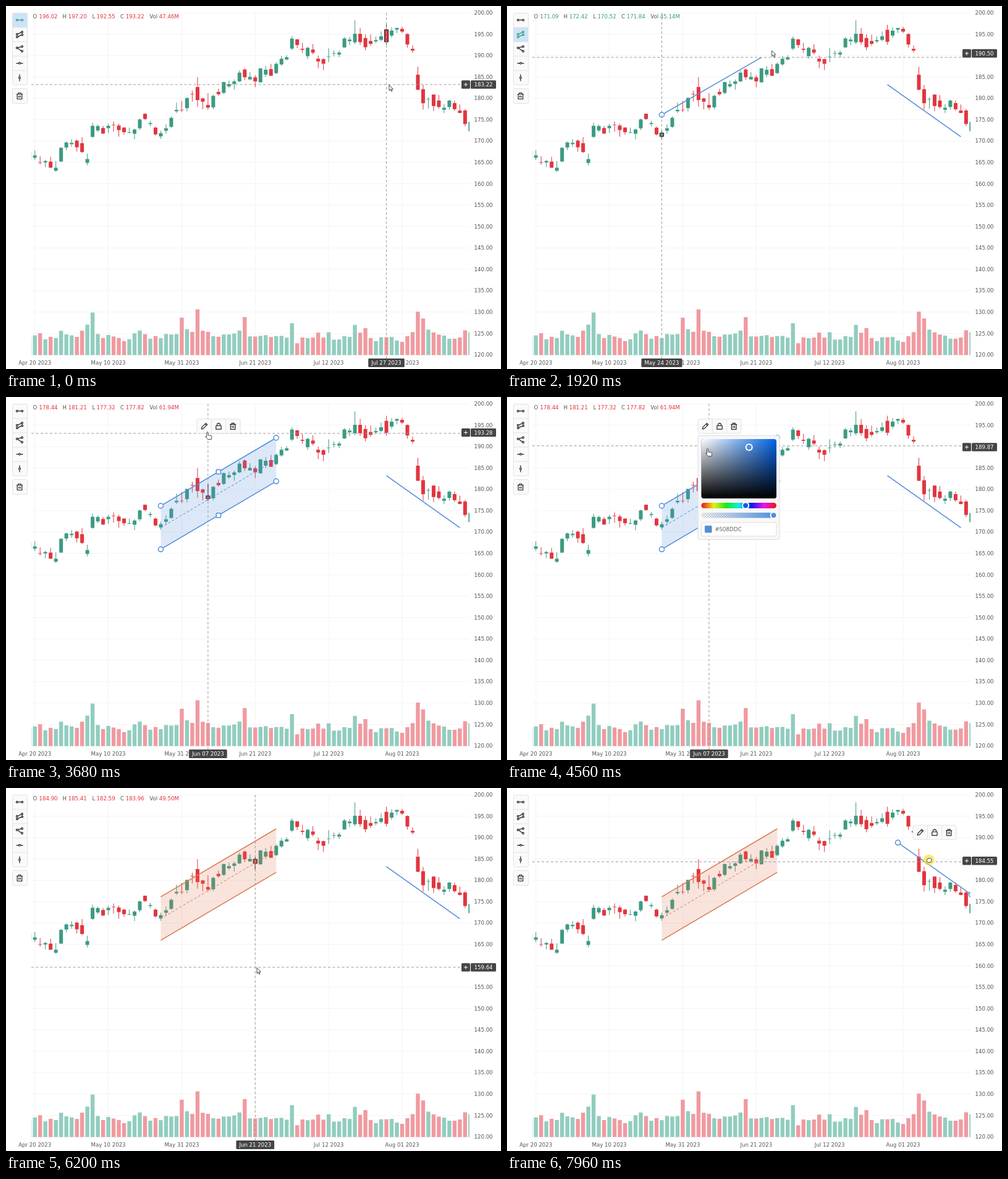
Animation of 801 by 587 pixels, one loop 8000 ms. Source, as an HTML page:

```html
<!DOCTYPE html>
<html lang="en">
<head>
<meta charset="utf-8">
<title>Chart drawing tools</title>
<style>
html, body { margin: 0; width: 100%; height: 100%; overflow: hidden; background: #fff; }
svg { display: block; font: 8.6px "DejaVu Sans", sans-serif; fill: #555; }
</style>
</head>
<body>
<svg id="stage" width="801" height="587" viewBox="0 0 801 587"></svg>
<script>
const LOOP = 8000, UP = '#3c9a82', DOWN = '#e2353f', DARK = '#454545';
const NS = 'http://www.w3.org/2000/svg';
const stage = document.getElementById('stage');

// Daily bars, first one on Apr 19 2023
const open = [165.8, 166.09, 165.05, 165, 165.19, 163.06, 165.19, 168.49, 169.28, 170.09, 169.5, 164.89, 170.98, 172.48, 173.05,
  173.02, 173.85, 173.62, 173.16, 171.99, 171.71, 173, 176.39, 173.98, 173.13, 171.09, 172.41, 173.32, 176.96,
  177.33, 177.7, 181.03, 182.63, 179.97, 178.44, 177.9, 181.5, 181.27, 182.8, 183.37, 183.96, 186.73, 184.41,
  184.9, 183.74, 185.55, 186.83, 185.89, 187.93, 189.08, 191.63, 193.78, 191.57, 189.84, 191.41, 189.26, 189.16,
  189.68, 190.5, 190.23, 191.9, 193.35, 193.1, 195.09, 194.1, 193.41, 193.33, 193.67, 196.02, 194.67, 196.06,
  196.24, 195.04, 191.57, 185.52, 182.13, 179.69, 180.87, 179.48, 177.32, 177.97, 178.88, 177.13, 177.14, 172.3];
const close = [167.63, 166.65, 165.02, 165.33, 163.77, 163.76, 168.41, 169.68, 169.59, 168.54, 167.45, 165.79, 173.57, 173.5, 171.77,
  173.56, 173.75, 172.57, 172.07, 172.07, 172.69, 175.05, 175.16, 174.2, 171.56, 171.84, 172.99, 175.43, 177.3,
  177.25, 180.09, 180.95, 179.58, 179.21, 177.82, 180.57, 180.96, 183.79, 183.31, 183.95, 186.01, 184.92, 185.01,
  183.96, 187, 186.68, 185.27, 188.06, 189.25, 189.59, 193.97, 192.46, 191.33, 191.81, 190.68, 188.61, 188.08,
  189.77, 190.54, 190.69, 193.99, 193.73, 195.1, 193.13, 191.94, 192.75, 193.62, 194.5, 193.22, 195.83, 196.45,
  195.61, 192.58, 191.17, 181.99, 178.85, 179.8, 178.19, 177.97, 177.79, 179.46, 177.45, 176.57, 174, 174.49];
const high = [168.16, 167.87, 166.45, 165.6, 166.31, 165.28, 168.56, 169.85, 170.45, 170.35, 170.92, 167.04, 174.3, 173.85, 173.54,
  174.03, 174.59, 174.06, 173.21, 173.14, 172.93, 175.24, 176.39, 174.71, 173.38, 172.42, 173.9, 175.77, 178.99,
  179.35, 180.12, 181.78, 184.95, 180.12, 181.21, 180.84, 182.23, 183.89, 184.15, 184.39, 186.52, 186.99, 186.1,
  185.41, 187.05, 187.56, 188.05, 188.39, 189.9, 190.07, 194.48, 193.88, 192.98, 192.02, 192.67, 189.99, 189.3,
  191.7, 191.19, 191.18, 194.32, 194.33, 198.23, 196.47, 194.97, 194.91, 194.44, 195.64, 197.2, 196.63, 196.49,
  196.73, 195.18, 192.37, 187.38, 183.13, 180.27, 180.93, 180.75, 178.62, 179.69, 179.48, 178.54, 177.51, 175.1];
const low = [165.54, 165.56, 164.49, 163.89, 163.73, 162.8, 165.19, 167.88, 168.64, 167.54, 167.16, 164.31, 170.76, 172.11, 171.6,
  171.9, 172.17, 171, 171.47, 171.8, 170.42, 172.58, 174.94, 173.45, 171.28, 170.52, 171.69, 173.11, 176.57,
  176.76, 176.93, 179.26, 178.04, 177.43, 177.32, 177.46, 180.63, 180.97, 182.44, 182.02, 183.78, 184.27, 184.41,
  182.59, 183.67, 185.01, 185.23, 185.67, 187.6, 188.94, 191.26, 191.76, 190.62, 189.2, 190.24, 187.04, 186.6,
  188.47, 189.78, 189.63, 191.81, 192.42, 192.65, 192.5, 191.23, 192.25, 192.92, 193.32, 192.55, 194.14, 195.26,
  195.28, 191.85, 190.69, 181.92, 177.35, 177.58, 177.01, 177.6, 176.55, 177.31, 177.05, 176.5, 173.48, 171.96];
const volume = [47.7, 52.5, 58.3, 41.9, 48.7, 45.5, 64.9, 55.2, 52.5, 48.4, 65.1, 81.2, 113.3, 56, 45.3,
  53.7, 49.5, 45.5, 37.3, 42.1, 58, 65.5, 55.8, 43.6, 50.7, 45.14, 56.1, 54.8, 56,
  99.6, 68.9, 61.9, 121.9, 64.8, 61.94, 50.2, 48.9, 54.8, 54.9, 57.5, 65.4, 101.2, 49.8,
  49.5, 51.2, 53.1, 48.1, 50.7, 51.2, 46.3, 85.1, 31.5, 46.9, 45.1, 46.8, 59.9, 46.6,
  60.75, 41.3, 41.6, 50.5, 48.4, 80.5, 59.6, 71.9, 45.4, 37.3, 47.5, 47.46, 48.3, 38.8,
  35.2, 50.39, 61.2, 115.8, 97.6, 67.8, 60.4, 54.7, 52, 43.7, 43.6, 46.96, 66.1, 61.2];

const X0 = 46.7, STEP = 8.49, PX = 6.9125;
const barX = i => X0 + i * STEP;
const barAt = x => Math.round((x - X0) / STEP);
const priceY = p => 11 + (200 - p) * PX;
const yPrice = y => 200 - (y - 11) / PX;
const rises = k => close[k] >= open[k];

const days = [];
for (let d = new Date(Date.UTC(2023, 3, 19)); days.length < open.length; d.setUTCDate(d.getUTCDate() + 1)) {
  const name = d.toLocaleDateString('en-US', { month: 'short', day: '2-digit', timeZone: 'UTC' }) + ' 2023';
  const closed = /May 29|Jun 19|Jul 04/.test(name);
  if (d.getUTCDay() % 6 && !closed) days.push(name);
}

function set(node, attrs) {
  for (const k in attrs) node.setAttribute(k, attrs[k]);
  return node;
}
function add(parent, tag, attrs = {}, text) {
  const node = parent.appendChild(set(document.createElementNS(NS, tag), attrs));
  if (text !== undefined) node.textContent = text;
  return node;
}
const group = (parent, attrs) => add(parent, 'g', attrs);
const rect = (parent, x, y, width, height, fill, more) => add(parent, 'rect', { x, y, width, height, fill, ...more });
const line = (parent, x1, y1, x2, y2, stroke, more) => add(parent, 'line', { x1, y1, x2, y2, stroke, ...more });
const path = (parent, d, more) => add(parent, 'path', { d, ...more });
const show = (node, on) => node.setAttribute('visibility', on ? 'inherit' : 'hidden');
const move = (node, x, y) => node.setAttribute('transform', `translate(${x} ${y})`);

const defs = add(stage, 'defs');
rect(add(defs, 'clipPath', { id: 'plot' }), 41, 8, 709, 557, '#000');
function gradient(id, stops, vertical) {
  const g = add(defs, 'linearGradient', vertical ? { id, x2: 0, y2: 1 } : { id });
  return stops.map(([color, alpha], i) =>
    add(g, 'stop', { offset: i / (stops.length - 1), 'stop-color': color, 'stop-opacity': alpha }));
}
gradient('white', [['#fff', 1], ['#fff', 0]]);
gradient('black', [['#000', 0], ['#000', 1]], true);
gradient('rainbow', [0, 60, 120, 180, 240, 300, 360].map(h => [`hsl(${h} 85% 50%)`, 1]));
const alphaStops = gradient('alpha', [['#000', 0], ['#000', 1]]);
const check = add(defs, 'pattern', { id: 'check', width: 4, height: 4, patternUnits: 'userSpaceOnUse' });
rect(check, 0, 0, 4, 4, '#fff');
path(check, 'M0 0h2v4h2v-2h-4z', { fill: '#ccc' });

// Grid, axes and bars
for (let p = 120; p <= 200; p += 5) {
  const y = priceY(p);
  line(stage, 41, y, 750, y, '#f4f4f4');
  add(stage, 'text', { x: 757.5, y: y + 3.1 }, p.toFixed(2));
}
for (let i = 0; i <= 70; i += 14) {
  line(stage, barX(i), 11, barX(i), 564, '#f4f4f4');
  add(stage, 'text', { x: barX(i), y: 579.7, 'text-anchor': 'middle' }, days[i + 1]);
}
const plot = group(stage, { 'clip-path': 'url(#plot)' });
function candle(parent, k, edge) {
  const x = barX(k - 1), color = rises(k) ? UP : DOWN;
  const top = priceY(Math.max(open[k], close[k])), h = Math.abs(open[k] - close[k]) * PX;
  line(parent, x, priceY(high[k]), x, priceY(low[k]), edge || color);
  rect(parent, x - 3, top, 6, Math.max(h, 0.8), color, edge ? { stroke: edge, 'stroke-width': 1.3 } : {});
}
open.forEach((_, k) => {
  const h = volume[k] * 0.607;
  rect(plot, barX(k - 1) - 3.2, 564.5 - h, 6.4, h, rises(k) ? '#91cdbf' : '#f09aa0');
  candle(plot, k);
});
const hover = group(plot);

// Drawings
const trend = group(plot, { fill: '#fff', 'stroke-width': 1.5 });
const channel = group(plot, { 'stroke-width': 1.5 });
const knob = (parent, shape) => shape === 'square'
  ? rect(parent, -3.6, -3.6, 7.2, 7.2, '#fff', { rx: 1 })
  : add(parent, 'circle', { r: 4, fill: '#fff' });
const trendLine = line(trend, 0, 0, 0, 0, '');
const trendKnobs = [knob(trend), knob(trend)];
const band = path(channel, '', { stroke: 'none', 'fill-opacity': 0.2 });
const edges = path(channel, '', { fill: 'none' });
const median = path(channel, '', { fill: 'none', 'stroke-width': 1, 'stroke-dasharray': '4 3' });
const bandKnobs = ['', '', '', '', 'square', 'square'].map(s => knob(channel, s));

// Legend and crosshair
const legend = group(stage);
const legendValues = [['O', 43.5, 53.5], ['H', 91.5, 100.7], ['L', 139.5, 146.6], ['C', 185, 193.7], ['Vol', 232.3, 247.8]].map(([name, x, vx]) => {
  add(legend, 'text', { x, y: 20.2 }, name);
  return add(legend, 'text', { x: vx, y: 20.2 });
});
const dash = { 'stroke-dasharray': '4 3.5' };
const across = line(stage, 41, 0, 737, 0, '#999', dash);
const upright = line(stage, 0, 11, 0, 570, '#999', dash);
const priceTag = group(stage);
rect(priceTag, 737, -6.8, 14, 13.6, DARK, { rx: 1.5 });
rect(priceTag, 752, -6.8, 41, 13.6, DARK, { rx: 1.5 });
path(priceTag, 'M741 0h6M744-3v6', { stroke: '#fff' });
const priceText = add(priceTag, 'text', { x: 757.5, y: 3.1, fill: '#fff' });
const dateTag = group(stage);
const dateBox = rect(dateTag, 0, 570, 0, 14, DARK, { rx: 1.5 });
const dateText = add(dateTag, 'text', { y: 579.9, fill: '#fff', 'text-anchor': 'middle' });

// Tool palette
const BORDER = '#e2e2e2';
rect(stage, 10.5, 11.5, 24, 116, '#fafafa', { rx: 2, stroke: BORDER });
rect(stage, 10.5, 133.5, 24, 24, '#fafafa', { rx: 2, stroke: BORDER });
const picked = rect(stage, 11, 0, 23, 23, '#cde4f8');
for (let i = 1; i < 5; i++) line(stage, 11, 11.5 + i * 23.2, 34, 11.5 + i * 23.2, BORDER);
const dot = (x, y) => `M${x - 1.4} ${y}a1.4 1.4 0 1 0 2.8 0a1.4 1.4 0 1 0-2.8 0z`;
const tools = [
  dot(-4.2, 0) + dot(4.2, 0) + 'M-2.8 0h5.6',
  dot(-4.2, -.2) + dot(4, -4) + dot(-4, 4) + dot(4.2, .5) + 'M-2.8-.8L2.6-3.4M-2.6 3.4L2.8 1.1',
  dot(-4.2, -1.6) + dot(4, -3.8) + dot(4, 3.8) + 'M-2.8-1.9L2.6-3.4M-3-1L2.6 3.1',
  dot(0, 0) + 'M-5.5 0h4.1M1.4 0h4.1',
  dot(0, 0) + 'M0-5.5v4.1M0 1.4v4.1'
].map((d, i) => path(stage, d, { fill: 'none', 'stroke-width': 1.2, transform: `translate(22 ${22.7 + i * 23.3})` }));
const ICON = { fill: 'none', stroke: '#222', 'stroke-width': 1.2, 'stroke-linejoin': 'round' };
const TRASH = 'M-5-3h10M-2-3v-2h4v2M-3.8-3v8h7.6v-8M-1.2-.8v3.6M1.2-.8v3.6';
path(stage, TRASH, { ...ICON, transform: 'translate(22 145.5)' });

// Floating toolbar
const bar = group(stage);
rect(bar, -35, -11.5, 70, 23, '#fafafa', { rx: 2, stroke: BORDER });
path(bar, 'M-11.7-11v22M11.7-11v22', { stroke: BORDER });
['M-4.5 4.5l.7-3 6.4-6.4 2.3 2.3-6.4 6.4zM1.2-3.6l2.3 2.3', 'M-4.2-.8h8.4v5.6h-8.4zM-2.5-.8v-1.7a2.5 2.5 0 0 1 5 0v1.7', TRASH]
  .forEach((d, i) => path(bar, d, { ...ICON, transform: `translate(${(i - 1) * 23.2} 0)` }));

// Colour picker
const picker = group(stage);
rect(picker, 309, 62.5, 132, 168, '#f8f8f8', { rx: 3, stroke: '#ddd' });
const field = ['', 'url(#white)', 'url(#black)'].map(f => rect(picker, 314.5, 68, 121.5, 96, f, { rx: 4 }));
rect(picker, 314.5, 171, 121.5, 9, 'url(#rainbow)', { rx: 4.5 });
rect(picker, 314.5, 187, 121.5, 8.5, 'url(#check)', { rx: 4.2 });
rect(picker, 314.5, 187, 121.5, 8.5, 'url(#alpha)', { rx: 4.2 });
const thumb = (cx, cy) => add(picker, 'circle', { cx, cy, r: 5, stroke: '#fff', 'stroke-width': 2 });
const fieldThumb = thumb(391.7, 81.2), hueThumb = thumb(0, 175.5), alphaThumb = thumb(431.5, 191.3);
rect(picker, 314.5, 203, 121.5, 22, '#fff', { rx: 3, stroke: '#ddd' });
const swatch = rect(picker, 320, 208, 11.5, 11.5, '', { rx: 1.5, stroke: '#bbb', 'stroke-width': .6 });
const hexText = add(picker, 'text', { x: 337, y: 216.6, style: 'font:9.6px "Open Sans",sans-serif' });

// Pointer
const halo = add(stage, 'circle', { r: 9, fill: '#f4e02c', opacity: .65 });
const pointer = group(stage, { fill: '#fff', stroke: '#333', 'stroke-width': .9, 'stroke-linejoin': 'round' });
const shapes = {
  arrow: path(pointer, 'M.5 0v9.4l2.1-2 1.6 3.3 1.4-.7-1.6-3.2h2.8z'),
  hand: path(pointer, 'M-1 1a1.1 1.1 0 0 1 2.2 0v4l5 1.2q1 .3.9 1.5l-.8 4.3h-5.4l-4-4.6q.3-1.2 2.1.2z'),
  grab: path(pointer, 'M-3-1.5q.6-1.6 2-1.2 1-1.2 2.2-.2 1.8-.6 2.4 1.2v3l-1.2 2.4h-4.2l-2.2-2.8z')
};

// Pointer route: time, x, y
const route = [
  [0, 619, 127], [40, 619, 127], [300, 672, 168], [520, 718, 203.4], [800, 731, 211.3], [1240, 731, 211.3],
  [1440, 22, 46], [1500, 22, 46], [1700, 251, 176], [1740, 251, 176], [1920, 427, 72], [2040, 437, 66],
  [2200, 437, 66], [2760, 437, 136.3], [3000, 437, 136.3], [3680, 326, 56.2], [3800, 321, 48], [4240, 321, 48],
  [5040, 333, 174], [5280, 330, 173.4], [5440, 325.1, 173.4], [5840, 325.1, 173.4], [6080, 405, 290], [6360, 405, 290],
  [6800, 640, 162], [6960, 653, 160.9], [7160, 664, 162.3], [7320, 666, 162.5], [7520, 666, 162.5],
  [7800, 674, 136], [7960, 683, 116.3], [8000, 684.5, 109]
];
const presses = [[840, 960], [1440, 1500], [1700, 1760], [2080, 2160], [2760, 2840], [3840, 3920], [5040, 5440], [6120, 6200], [7240, 8000]];

function slope(i, c) {
  const a = route[i - 1], p = route[i], b = route[i + 1];
  const still = q => !q || (q[1] === p[1] && q[2] === p[2]);
  return still(a) || still(b) ? 0 : (b[c] - a[c]) / (b[0] - a[0]);
}
function pos(t) {
  t = Math.max(0, Math.min(t, LOOP - 0.01));
  const i = route.findIndex((p, k) => t < route[k + 1][0]);
  const a = route[i], b = route[i + 1], d = b[0] - a[0], u = (t - a[0]) / d;
  const at = c => {
    const u2 = u * u, u3 = u2 * u;
    return a[c] * (2 * u3 - 3 * u2 + 1) + b[c] * (3 * u2 - 2 * u3)
      + d * (slope(i, c) * (u3 - 2 * u2 + u) + slope(i + 1, c) * (u3 - u2));
  };
  return { x: at(1), y: at(2) };
}
function hsv(h, s, v) {
  const part = n => {
    const k = (n + h / 60) % 6;
    return Math.round(255 * v * (1 - s * Math.max(0, Math.min(k, 4 - k, 1))));
  };
  return '#' + [5, 3, 1].map(n => part(n).toString(16).padStart(2, '0')).join('').toUpperCase();
}
const tint = h => hsv(h, 140 / 220, 220 / 255);
const BLUE = tint(214);
const LAG = 24;
let lastBar = null;

function drawTrend(t) {
  const end = pos(Math.min(t, 840) - LAG), drag = pos(t - 56);
  const moving = t >= 7520;
  const dx = moving ? Math.round((drag.x - 666) / STEP) * STEP : 0;
  const dy = moving ? drag.y - 162.5 : 0;
  const x1 = barX(67) + dx, y1 = 127.2 + dy, x2 = barX(barAt(end.x)) + dx, y2 = end.y + dy;
  set(trend, { stroke: BLUE });
  set(trendLine, { x1, y1, x2, y2, stroke: BLUE });
  show(trendLine, t >= 40);
  move(trendKnobs[0], x1, y1);
  move(trendKnobs[1], x2, y2);
  show(trendKnobs[0], (t >= 40 && t < 1240) || moving);
  show(trendKnobs[1], moving);
  if (moving) move(bar, (x1 + x2) / 2, y1 - 16.5);
}

function drawChannel(t, color) {
  show(channel, t >= 1740);
  const end = pos(Math.min(t, 2200) - LAG), wide = t > 2200;
  const h = wide ? pos(Math.min(t, 2900) - LAG).y - 66 : 0;
  const x1 = barX(24), y1 = 176, x2 = barX(barAt(end.x)), y2 = end.y;
  const seg = d => `M${x1} ${y1 + d}L${x2} ${y2 + d}`;
  set(channel, { stroke: color });
  set(band, { d: `${seg(0)}V${y2 + h}L${x1} ${y1 + h}z`, fill: color });
  set(edges, { d: seg(0) + (wide ? seg(h) : '') });
  set(median, { d: wide ? seg(h / 2) : '' });
  const mx = (x1 + x2) / 2, my = (y1 + y2) / 2;
  const chosen = t >= 3000 && t < 6160;
  [[x1, y1], [x2, y2], [x1, y1 + h], [x2, y2 + h], [mx, my], [mx, my + h]].forEach(([x, y], i) => {
    move(bandKnobs[i], x, y);
    show(bandKnobs[i], chosen || (t < 3000 && (i === 0 || (i === 1 && wide))));
  });
  if (chosen) move(bar, 344, 47.3);
  show(bar, chosen || t >= 7520);
}

function drawCross(t) {
  const p = pos(t - LAG), tagY = pos(t - LAG / 2).y;
  const inside = p.x > 41, dragging = t >= 7520;
  const i = t < 1240 ? 67 : t >= 1740 && t < 3000 ? 24 : barAt(p.x);
  const track = inside && !dragging;
  set(across, { y1: p.y, y2: p.y });
  move(priceTag, 0, tagY);
  priceText.textContent = yPrice(tagY).toFixed(2);
  show(across, inside);
  show(priceTag, inside);
  [upright, dateTag, legend, hover].forEach(n => show(n, track));
  if (!track || i === lastBar) return;
  lastBar = i;
  const k = i + 1, x = barX(i);
  set(upright, { x1: x, x2: x });
  set(dateText, { x }).textContent = days[k];
  const w = dateText.getComputedTextLength() + 10;
  set(dateBox, { x: x - w / 2, width: w });
  [open, high, low, close, volume].forEach((s, n) => {
    legendValues[n].textContent = s[k].toFixed(2) + (n === 4 ? 'M' : '');
    set(legendValues[n], { fill: rises(k) ? UP : DOWN });
  });
  hover.replaceChildren();
  candle(hover, k, '#333');
}

function drawPicker(t, hue, color) {
  show(picker, t >= 3960 && t < 6160);
  const pure = hsv(hue, 1, .9);
  set(field[0], { fill: pure });
  set(fieldThumb, { fill: color });
  set(hueThumb, { cx: 319.5 + hue / 360 * 112, fill: pure });
  set(alphaThumb, { fill: color });
  set(swatch, { fill: color });
  alphaStops.forEach(s => set(s, { 'stop-color': color }));
  hexText.textContent = color;
}

function drawTools(t) {
  const tool = t < 1240 ? 0 : t < 1480 ? -1 : t < 3000 ? 1 : -1;
  show(picked, tool >= 0);
  set(picked, { y: 11.7 + tool * 23.2 });
  tools.forEach((n, i) => set(n, { stroke: i === tool ? '#2f9a84' : '#222' }));
}

function drawPointer(t) {
  const p = pos(t);
  const kind = t >= 7520 ? 'grab' : p.x < 35 || (t > 3600 && t < 5900) || (t > 7160) ? 'hand' : 'arrow';
  move(pointer, p.x + (kind === 'arrow' ? .5 : 0), p.y + .5);
  for (const k in shapes) show(shapes[k], k === kind);
  move(halo, p.x - .5, p.y + .3);
  show(halo, presses.some(([a, b]) => t >= a && t < b));
}

function draw(t) {
  const hue = t < 5040 ? 214 : (pos(Math.min(t, 5440)).x - 319.5) / 112 * 360;
  const color = tint(hue);
  drawTrend(t);
  drawChannel(t, color);
  drawCross(t);
  drawPicker(t, hue, color);
  drawTools(t);
  drawPointer(t);
}

const start = performance.now();
function tick(now) {
  draw(Math.max(0, now - start) % LOOP);
  requestAnimationFrame(tick);
}
draw(0);
requestAnimationFrame(tick);
</script>
</body>
</html>
```
